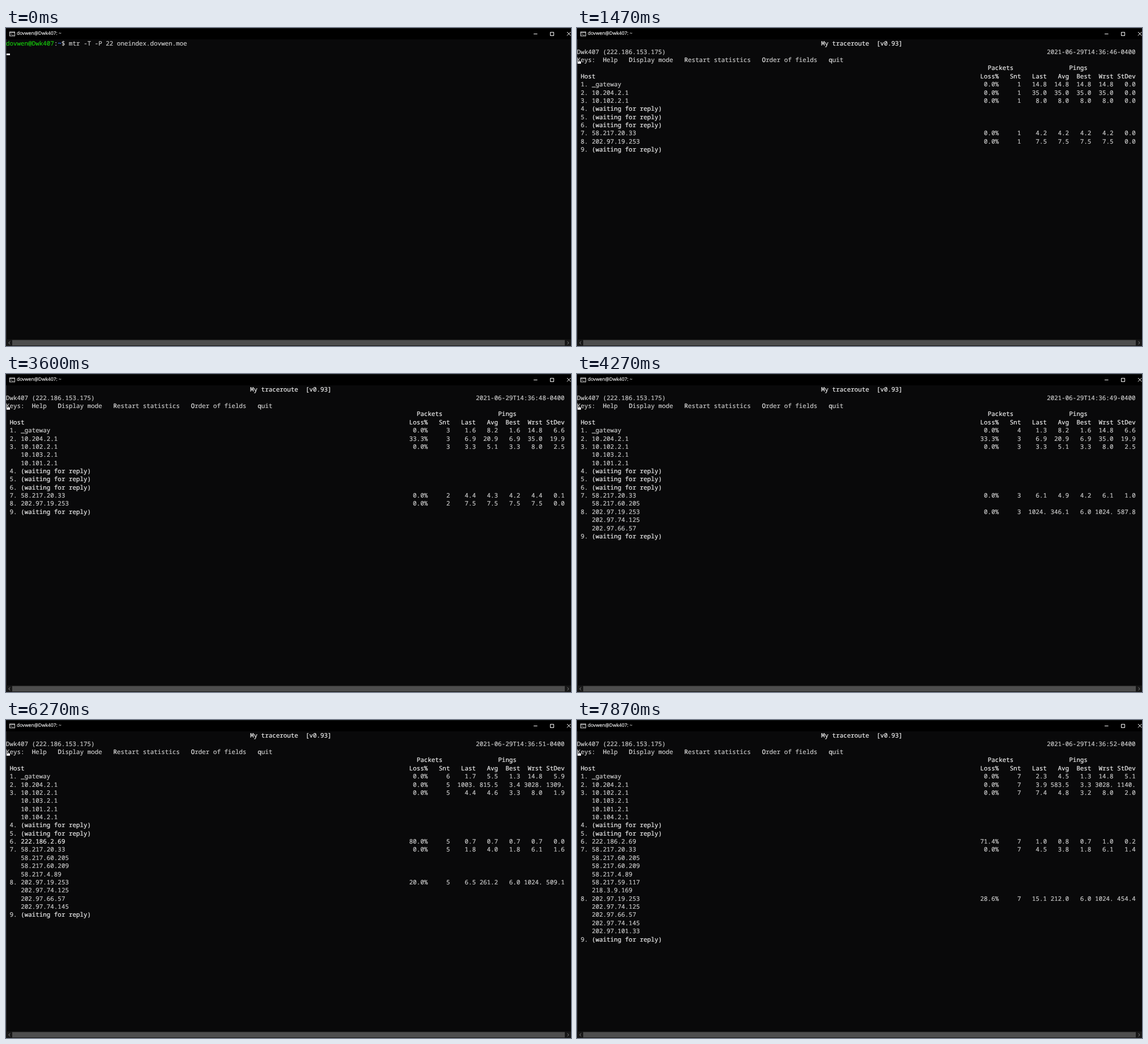
Write an HTML page that moves like this. It is 998 by 561 pixels and loops after 8 s.

```html
<!DOCTYPE html>
<html lang="en">
<head>
<meta charset="utf-8">
<title>Terminal</title>
<style>
  html, body { margin: 0; width: 100%; height: 100%; overflow: hidden; background: #09090a; }
  #stage { position: relative; width: 998px; height: 561px; overflow: hidden; background: #09090a; }
  #chrome { position: absolute; left: 0; top: 0; }
  #title {
    position: absolute; left: 19px; top: 3px; color: #fff; white-space: pre;
    font: 8.4px/14px "Open Sans", "Noto Sans", sans-serif; text-rendering: geometricPrecision;
    -webkit-text-stroke: 0.15px;
  }
  #screen span {
    position: absolute; white-space: pre; color: #cccccc;
    font: 10.89px/14.37px "Noto Sans Mono", "DejaVu Sans Mono", monospace;
    text-rendering: geometricPrecision; font-variant-ligatures: none;
    -webkit-text-stroke: 0.2px;
  }
  #screen .b { color: #f2f2f2; }
  #screen .g { color: #16c60c; }
  #screen .u { color: #3b78ff; }
  #cursor { position: absolute; left: 0.5px; width: 6.5px; height: 3.5px; background: #f4f2f8; }
</style>
</head>
<body>
<div id="stage">
  <svg id="chrome" width="998" height="561" fill="none">
    <rect width="998" height="20" fill="#000"/>
    <rect width="998" height="1" fill="#161a19"/>
    <rect y="20" width="1" height="541" fill="#2a2a2a"/>
    <rect x="6.5" y="7" width="9" height="7" stroke="#ddd"/>
    <path d="M6 8h10" stroke="#ddd"/>
    <path d="M8.3 10l1.5 1.1-1.5 1.1M11 12.3h2.5" stroke="#ddd" stroke-width=".8"/>
    <path d="M932 10.5h6.5M961.5 7.5h6v6h-6zM991 7l6.5 6.5M997.5 7L991 13.5" stroke="#fff"/>
    <rect y="549.5" width="998" height="11.5" fill="#171717"/>
    <rect x="11" y="550.5" width="976" height="9.5" fill="#4d4d4d"/>
    <path d="M7.3 553l-2.6 2.5 2.6 2.5M991.5 553l2.6 2.5-2.6 2.5" stroke="#8a8a8a"/>
  </svg>
  <div id="title"></div>
  <div id="screen"></div>
  <div id="cursor"></div>
</div>
<script>
const USER = 'dovwen', HOST = 'Dwk407';
const LOOP = 8000, FRAME = 400 / 3;
const CELL = 6.535, LINE = 14.37, TOP = 21.3;
const START = 270;                                        // table replaces the prompt
const CYCLES = [350, 2050, 3100, 4230, 5250, 6220, 7080]; // first probe of each round
const STEP = 100, LAG = 70;                               // between hops; before averages refresh

// pings: rounds split by "|", "?" still pending, "-" lost; hosts: [round first seen, address]
const HOPS = [
  { hosts: [[1, '_gateway']], pings: '14.84|8.04|1.64|1.3|1.7|1.7|2.3' },
  { hosts: [[1, '10.204.2.1']], pings: '34.97|?|6.87|3.36 3028.58|1003.8|3.26|3.86' },
  { hosts: [[1, '10.102.2.1'], [2, '10.103.2.1'], [3, '10.101.2.1'], [4, '10.104.2.1']],
    pings: '7.97|3.945|3.3|3.5|4.4|3.2|7.4' },
  {}, {},
  { hosts: [[4, '222.186.2.69']], pings: '-|-|-|.69|-|?|.97' },
  { hosts: [[1, '58.217.20.33'], [3, '58.217.60.205'], [4, '58.217.60.209'],
            [5, '58.217.4.89'], [6, '58.217.59.117'], [7, '218.3.9.169']],
    pings: '4.23|4.4|6.1|3.5|1.82|2.3|4.5' },
  { hosts: [[1, '202.97.19.253'], [3, '202.97.74.125'], [3, '202.97.66.57'],
            [5, '202.97.74.145'], [7, '202.97.101.33']],
    pings: '7.5|?|6.0 1024.8|?|6.5|?|15.1' },
  {}
];

const screen = document.getElementById('screen');
const cursor = document.getElementById('cursor');
document.getElementById('title').textContent = `${USER}@${HOST}: ~`;

function put(row, col, text, cls = '') {
  const s = document.createElement('span');
  s.textContent = text;
  s.className = cls;
  s.style.left = col * CELL + 'px';
  s.style.top = TOP + row * LINE + 'px';
  screen.append(s);
}

const putRight = (row, end, text, cls) => put(row, end - text.length, text, cls);
const ms = v => v.toFixed(1).slice(0, 5);
const roundAt = (t, hop) => CYCLES.filter(c => t >= c + hop * STEP).length;

function stats(pings, round) {
  const parts = pings.split('|').slice(0, round);
  const got = parts.join(' ').split(' ').filter(v => v !== '?' && v !== '-').map(Number);
  const n = got.length;
  const avg = got.reduce((a, v) => a + v, 0) / n;
  const dev = n > 1 ? Math.sqrt(got.reduce((a, v) => a + (v - avg) ** 2, 0) / (n - 1)) : 0;
  const pending = parts[round - 1] === '?' ? 1 : 0;
  return {
    loss: (100 * (1 - n / (round - pending))).toFixed(1) + '%',
    down: parts.filter(p => p !== '?').pop() === '-',
    last: got[n - 1],
    spread: [avg, Math.min(...got), Math.max(...got), dev]
  };
}

function drawPrompt() {
  put(0, 0, `${USER}@${HOST}`, 'g');
  put(0, 13, ':');
  put(0, 14, '~', 'u');
  put(0, 15, `$ mtr -T -P 22 oneindex.${USER}.moe`);
}

function drawHeader(t) {
  put(0, 66, 'My traceroute  [v0.93]', 'b');
  put(1, 0, `${HOST} (222.186.153.175)`);
  putRight(1, 151, `2021-06-29T14:36:${45 + Math.floor(t / 1000)}-0400`);
  put(2, 0, 'Keys:');
  const keys = [[7, 'Help'], [14, 'Display mode'], [29, 'Restart statistics'],
                [50, 'Order of fields'], [68, 'quit']];
  for (const [col, word] of keys) {
    put(2, col, word[0], 'b');
    put(2, col + 1, word.slice(1));
  }
  put(3, 111, 'Packets', 'b');
  put(3, 133, 'Pings', 'b');
  put(4, 1, 'Host', 'b');
  const heads = [[114, 'Loss%'], [120, 'Snt'], [127, 'Last'], [133, 'Avg'],
                 [139, 'Best'], [145, 'Wrst'], [151, 'StDev']];
  for (const [end, word] of heads) putRight(4, end, word, 'b');
}

function drawHops(t) {
  let row = 5;
  HOPS.forEach((hop, i) => {
    const round = roundAt(t, i);
    if (!round) return;
    put(row, 1, `${i + 1}.`);
    const seen = (hop.hosts || []).filter(h => h[0] <= round);
    if (!seen.length) {
      put(row++, 4, '(waiting for reply)', 'b');
      return;
    }
    const now = stats(hop.pings, round);
    const settled = Math.max(seen[0][0], roundAt(t - LAG, i));
    putRight(row, 114, now.loss);
    putRight(row, 120, String(round));
    putRight(row, 127, ms(now.last));
    stats(hop.pings, settled).spread.forEach((v, k) => putRight(row, 133 + 6 * k, ms(v)));
    seen.forEach((h, k) => put(row++, 4, h[1], now.down && !k ? 'b' : ''));
  });
}

function draw(t) {
  screen.textContent = '';
  const running = t >= START - 5;
  if (running) {
    drawHeader(t);
    drawHops(t);
  } else {
    drawPrompt();
  }
  cursor.style.top = (running ? 59.2 : 44.9) + 'px';
}

let shown = -1;
const origin = performance.now();
function tick() {
  const t = (performance.now() - origin) % LOOP;
  const frame = Math.floor((t + 4) / FRAME) % 60;
  if (frame !== shown) {
    shown = frame;
    draw(frame * FRAME);
  }
  requestAnimationFrame(tick);
}
tick();
</script>
</body>
</html>
```
